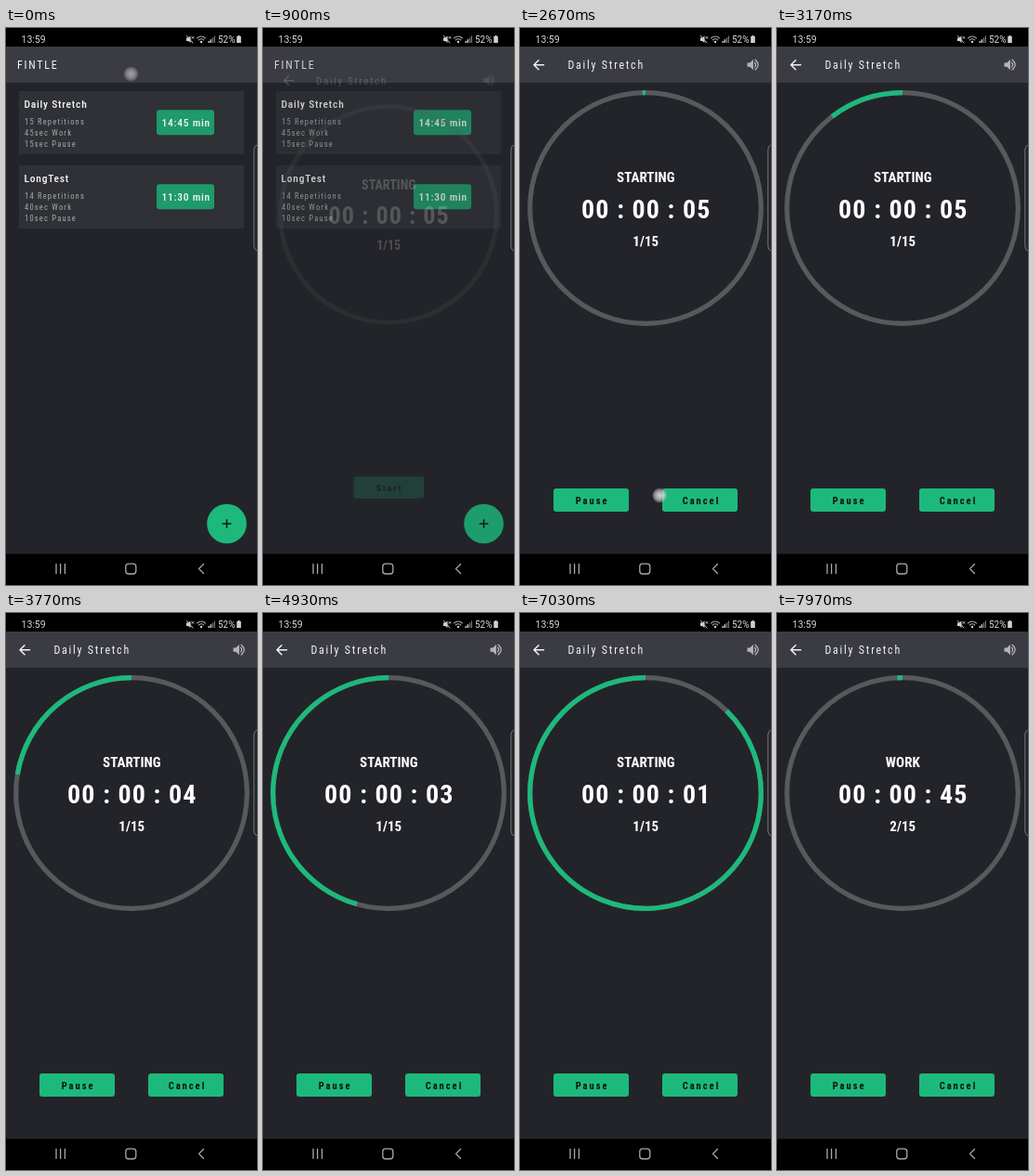
Write an HTML page that moves like this. It is 270 px wide and 600 px high and loops after 8 s.

```html
<!DOCTYPE html>
<html lang="en">
<head>
<meta charset="utf-8">
<title>Interval timer</title>
<style>
  html, body { margin: 0; width: 100%; height: 100%; overflow: hidden; background: #000; }
  svg { display: block; width: 100vw; height: 100vh; }
  text {
    font-family: "Roboto Condensed", Roboto, sans-serif;
    font-stretch: condensed;
    letter-spacing: calc(var(--track, 0px) - var(--tight, 0px));
    fill: #f4f4f5;
    white-space: pre;
  }
  .status { font: 10.5px Roboto, sans-serif; letter-spacing: 0; fill: #d8d8d8; }
  .header { font-size: 12px; --track: 1.75px; }
  .title { font-size: 11.5px; font-weight: 500; --track: .75px; }
  .detail { font-size: 8.5px; --track: 1.2px; fill: #a9a9ac; }
  .button { font-size: 10.5px; font-weight: 700; --track: 2px; fill: #0b120f; }
  .label { font-size: 15px; font-weight: 700; text-anchor: middle; fill: #fff; }
  .clock { font-size: 28px; font-weight: 700; --track: 1.1px; text-anchor: middle; fill: #fff; }
  .green { fill: #1db97c; }
  .line { fill: none; stroke-linecap: round; stroke-linejoin: round; }
</style>
</head>
<body>
<svg viewBox="0 0 270 600">
  <defs>
    <radialGradient id="glow">
      <stop offset="0" stop-color="#fff" stop-opacity=".8"/>
      <stop offset=".6" stop-color="#e4e0e4" stop-opacity=".65"/>
      <stop offset="1" stop-color="#aaa6aa" stop-opacity=".35"/>
    </radialGradient>
  </defs>
  <rect width="270" height="600" fill="#232429"/>
  <rect y="20" width="270" height="39" fill="#3b3c43"/>

  <g id="list">
    <text class="header" x="12" y="44">FINTLE</text>
    <g id="cards"></g>
    <circle class="green" cx="237.5" cy="534" r="21.3"/>
    <path d="M232.7 534h9.6M237.5 529.2v9.6" stroke="#101513" stroke-width="1.5"/>
  </g>

  <g id="timer">
    <path class="line" d="M25.5 39.8H15.2M20 34.8l-5 5 5 5" stroke="#f2f2f2" stroke-width="1.5"/>
    <text class="header" x="51.5" y="44">Daily Stretch</text>
    <path d="M244.5 37.5h2.8l3.6-3.5v11.2l-3.6-3.5h-2.8z" fill="#b5b5b9"/>
    <path class="line" d="M252.6 37.3q2 2.3 0 4.6M253 34.3q6.4 5.3 0 10.6" stroke="#b5b5b9" stroke-width="1.3"/>
    <circle cx="135" cy="194" r="124.3" fill="none" stroke="#58595d" stroke-width="5.2"/>
    <path id="arc" fill="none" stroke="#1db97c" stroke-width="5.2"/>
    <text id="phase" class="label" x="135.3" y="165.5"/>
    <text id="clock" class="clock" x="135.8" y="205"/>
    <text id="round" class="label" x="135.2" y="235"/>
    <g id="idle"></g>
    <g id="running"></g>
  </g>

  <path class="line" d="M270 126q-3.2 1-3.2 5v104q0 4 3.2 5" stroke="#77787c" stroke-width="1"/>

  <rect width="270" height="20" fill="#000"/>
  <text class="status" x="16.5" y="16.2">13:59</text>
  <text class="status" x="228" y="16.2" style="font-size:10px">52%</text>
  <g fill="#d0d0d0">
    <path d="M194 10.5h2l2.5-2v7.5l-2.5-2h-2z"/>
    <path class="line" d="M194.5 8.5l6.5 7.5M200 9.5l1.8 1.8M201.8 9.5l-1.8 1.8" stroke="#d0d0d0"/>
    <path class="line" d="M205.5 11q4.5-4 9 0M207.2 13q2.8-2.4 5.6 0" stroke="#a8a8a8" stroke-width="1.1"/>
    <circle cx="210" cy="15" r="1.2"/>
    <path d="M217.5 14h1.4v2h-1.4zM219.6 12.3h1.4v3.7h-1.4z"/>
    <path d="M221.7 10.4h1.4v5.6h-1.4zM223.8 8.5h1.2v7.5h-1.2z" fill="#777"/>
    <path d="M249.5 8h2v1h1.3v7h-4.6V9h1.3z"/>
  </g>

  <rect y="566.5" width="270" height="33.5" fill="#000"/>
  <g class="line" stroke="#a9a9a9" stroke-width="1.3">
    <path d="M54 577.5v10M58.6 577.5v10M63.4 577.5v10M212.5 577.5l-5 5 5 5"/>
    <rect x="128.8" y="577.2" width="11" height="10.8" rx="3"/>
  </g>
  <circle id="touch" r="7.8" fill="url(#glow)"/>
</svg>

<script>
const LOOP = 8000;
const START = 2650;          // countdown begins
const PREPARE = 5, WORK = 45; // seconds
const $ = id => document.getElementById(id);
const clamp = v => Math.max(0, Math.min(1, v));
const ramp = (t, from, to) => clamp((t - from) / (to - from));
const twoDigits = n => String(n).padStart(2, '0');

const text = (cls, x, y, value) => `<text class="${cls}" x="${x}" y="${y}">${value}</text>`;
const box = (x, y, w, h, fill, r = 0) =>
  `<rect x="${x}" y="${y}" width="${w}" height="${h}" rx="${r}" fill="${fill}"/>`;
const button = (x, textX, label) =>
  box(x, 496, 81, 25, '#1db97c', 3) + text('button', textX, 513, label);

function card(y, name, lines, total) {
  return box(14, y, 242, 68, '#2f3136') +
    text('title', 19.5, y + 17.6, name) +
    lines.map((line, i) => text('detail', 20, y + 36 + 12 * i, line)).join('') +
    box(162, y + 20.3, 62, 27, '#1f9a6b', 3) +
    text('title', 167.5, y + 38, total);
}

$('cards').innerHTML =
  card(68, 'Daily Stretch', ['15 Repetitions', '45sec Work', '15sec Pause'], '14:45 min') +
  card(148, 'LongTest', ['14 Repetitions', '40sec Work', '10sec Pause'], '11:30 min');
$('idle').innerHTML = button(94.8, 120.7, 'Start');
$('running').innerHTML = button(36, 59.7, 'Pause') + button(153, 174.7, 'Cancel');

// Without a condensed face, tighten the tracking instead.
const pen = document.createElement('canvas').getContext('2d');
const widthIn = font => (pen.font = `40px ${font}`, pen.measureText('Stretch').width);
if (widthIn('"Roboto Condensed", monospace') === widthIn('monospace')) {
  document.documentElement.style.setProperty('--tight', '.06em');
}

// Counter-clockwise from the top of the ring.
function arcPath(fraction) {
  if (fraction <= 0) return '';
  const a = 2 * Math.PI * Math.min(fraction, .9999), r = 124.3;
  return `M135 ${194 - r}A${r} ${r} 0 ${+(fraction > .5)} 0 ` +
    `${135 - r * Math.sin(a)} ${194 - r * Math.cos(a)}`;
}

function drawTimer(t) {
  const elapsed = Math.max(0, t - START) / 1000;
  const working = elapsed >= PREPARE;
  const length = working ? WORK : PREPARE;
  const spent = working ? elapsed - PREPARE : elapsed;
  $('arc').setAttribute('d', arcPath(spent / length));
  $('phase').textContent = working ? 'WORK' : 'STARTING';
  $('clock').textContent = `00 : 00 : ${twoDigits(length - Math.floor(spent))}`;
  $('round').textContent = working ? '2/15' : '1/15';
  const running = t >= 2600;
  $('idle').style.display = running ? 'none' : '';
  $('running').style.display = running ? '' : 'none';
}

function drawTransition(t) {
  const p = 1 - (1 - ramp(t, 880, 1190)) ** 3;
  const scale = .92 + .08 * p;
  $('list').setAttribute('opacity', 1 - p);
  $('timer').setAttribute('opacity', p);
  $('timer').setAttribute('transform',
    `translate(135 300) scale(${scale}) translate(-135 -300)`);
}

function drawTouch(t) {
  const first = t < 1000;
  const opacity = first ? .65 * (1 - ramp(t, 30, 200))
    : ramp(t, 2000, 2060) * (1 - ramp(t, 2680, 2760));
  $('touch').setAttribute('cx', first ? 134.5 : 150.3);
  $('touch').setAttribute('cy', first ? 49.5 : 503.5);
  $('touch').setAttribute('opacity', opacity);
}

const origin = performance.now();
function frame() {
  const t = (performance.now() - origin) % LOOP;
  drawTransition(t);
  drawTimer(t);
  drawTouch(t);
  requestAnimationFrame(frame);
}
frame();
</script>
</body>
</html>
```
